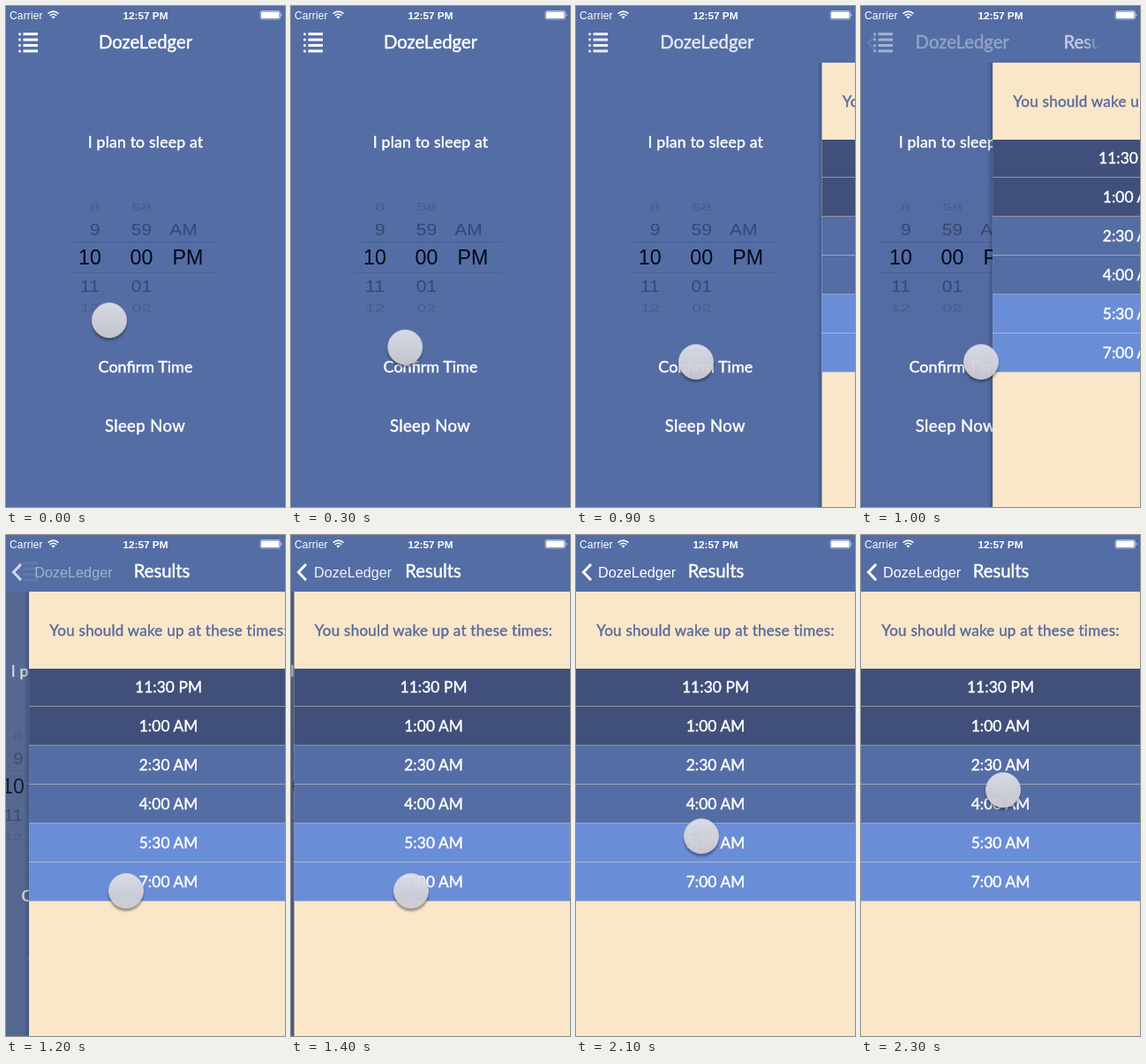
Animation of 316x566 px, one loop 2400 ms. Source, as an HTML page:

```html
<!DOCTYPE html>
<html lang="en">
<head>
<meta charset="utf-8">
<title>Sleep planner</title>
<style>
  html, body { margin: 0; width: 100%; height: 100%; overflow: hidden; background: #546da5; }
  svg { display: block; width: 316px; height: 566px; }
  text { font-family: Lato, sans-serif; fill: #fff; white-space: pre; }
  .geo { stroke: #fff; stroke-width: .45px; }
  .note { fill: #596a9b; stroke: #596a9b; stroke-width: .4px; }
  .heading { fill: url(#reveal); stroke: url(#reveal); stroke-width: .45px; }
  .sys { font-family: "Liberation Sans", Arial, sans-serif; }
  .wheel { fill: #000818; }
</style>
</head>
<body>
<svg viewBox="0 0 316 566">
  <defs>
    <linearGradient id="edge"><stop stop-color="#101c38" stop-opacity="0"/><stop offset="1" stop-color="#101c38" stop-opacity=".25"/></linearGradient>
    <linearGradient id="reveal" gradientUnits="userSpaceOnUse" x1="0" x2="20"><stop stop-color="#fff"/><stop offset="1" stop-color="#fff" stop-opacity="0"/></linearGradient>
    <linearGradient id="idle" x2="0" y2="1"><stop stop-color="#e6e8f0"/><stop offset="1" stop-color="#d2d2d8"/></linearGradient>
    <linearGradient id="pressed" x2="0" y2="1"><stop stop-color="#adabb2"/><stop offset="1" stop-color="#cac8cd"/></linearGradient>
    <filter id="soft" x="-30%" y="-30%" width="160%" height="160%"><feGaussianBlur stdDeviation="1.2"/></filter>
  </defs>
  <rect width="316" height="566" fill="#546da5"/>
  <g id="planner">
    <g id="wheels"></g>
    <path d="M72 266.5H240M72 301.5H240" stroke="#3d5284" stroke-opacity=".4"/>
    <text class="geo" x="158" y="160" font-size="17.6" letter-spacing=".2" text-anchor="middle">I plan to sleep at</text>
    <text class="geo" id="confirm" x="158" y="413.7" font-size="18" text-anchor="middle">Confirm Time</text>
    <text class="geo" x="157.5" y="481" font-size="18.5" letter-spacing=".4" text-anchor="middle">Sleep Now</text>
  </g>
  <rect id="dim" y="64" width="316" height="502" fill="#5a5a5a"/>
  <g id="results">
    <rect x="-6" y="64" width="6" height="502" fill="url(#edge)"/>
    <rect y="64" width="316" height="502" fill="#fae7c9"/>
    <g id="rows"></g>
    <text class="note" x="158" y="113.7" font-size="17" letter-spacing=".25" text-anchor="middle">You should wake up at these times:</text>
  </g>
  <rect width="316" height="64" fill="#546da5"/>
  <g id="menu" fill="#fff"></g>
  <path id="chevron" d="M17 33L8.5 42L17 51" fill="none" stroke="#fff" stroke-width="3"/>
  <text class="geo" id="title" y="48" font-size="20.3" text-anchor="middle">DozeLedger</text>
  <text class="sys" id="back" y="48" font-size="16.2">DozeLedger</text>
  <text class="heading" id="heading" y="48" font-size="20.3" text-anchor="middle">Results</text>
  <text class="sys" x="4" y="14.5" font-size="12" letter-spacing=".15">Carrier</text>
  <g fill="none" stroke="#fff" stroke-width="1.5">
    <path d="M47.5 8.6Q53.5 3.6 59.5 8.6M49.7 10.9Q53.5 7.7 57.3 10.9"/>
    <path d="M53.5 14.6L51.4 12.3Q53.5 10.8 55.6 12.3Z" fill="#fff" stroke="none"/>
  </g>
  <text class="sys" x="158" y="14.5" font-size="11.8" font-weight="700" text-anchor="middle">12:57 PM</text>
  <rect x="288" y="5.5" width="22.5" height="9.5" rx="1.8" fill="none" stroke="#fff" stroke-opacity=".5"/>
  <rect x="289" y="6.5" width="20.5" height="7.5" rx="1" fill="#fff"/>
  <path d="M311.5 8.5Q313.6 10.2 311.5 12Z" fill="#fff" opacity=".8"/>
  <g id="finger">
    <circle cy="3" r="20" fill="#20242e" opacity=".42" filter="url(#soft)"/>
    <circle id="pad" r="19.5" opacity=".9" stroke="#d3d3da"/>
  </g>
</svg>
<script>
const LOOP = 2400, STEP = 100, WIDTH = 316;
const $ = id => document.getElementById(id);
const set = (id, attrs) => {
  for (const name in attrs) $(id).setAttribute(name, attrs[name]);
};
const clamp = v => Math.max(0, Math.min(1, v));
const smooth = v => v * v * (3 - 2 * v);

// Each wheel row: y centre, font size, vertical squash, opacity
const wheelRows = [
  [227, 20, .55, .17], [252, 21, .86, .36], [284, 23.2, 1, 1],
  [316, 21, .86, .36], [341, 20, .55, .17]
];
const columns = [
  { x: 95, labels: ["  8", "  9", "10", "11", "12"] },
  { x: 153.5, labels: ["58", "59", "00", "01", "02"] }
];
const wheelText = (x, label, [y, size, squash, opacity]) =>
  `<text class="sys wheel" transform="translate(${x} ${y}) scale(1 ${squash})" y="${size * .36}"
    font-size="${size}" text-anchor="middle" opacity="${opacity}">${label}</text>`;

$("wheels").innerHTML = columns.map(c =>
  c.labels.map((label, i) => wheelText(c.x, label, wheelRows[i])).join("")
).join("") + wheelText(201, "AM", wheelRows[1]) + wheelText(206, "PM", wheelRows[2]);

const times = ["11:30 PM", "1:00 AM", "2:30 AM", "4:00 AM", "5:30 AM", "7:00 AM"];
const shades = ["#40507a", "#546da5", "#6a8dd8"];
$("rows").innerHTML = times.map((time, i) => {
  const y = 150 + 44 * i;
  return `<rect y="${i ? y : 151}" width="316" height="${i ? 44 : 43}" fill="${shades[i >> 1]}"/>
    <rect y="${y + 43}" width="316" height="1" fill="#fae7c9" opacity=".45"/>
    <text class="geo" x="158" y="${y + 28.2}" font-size="17.3" letter-spacing=".1" text-anchor="middle">${time}</text>`;
}).join("");

$("menu").innerHTML = [0, 1, 2, 3].map(i => 30.2 + 6.4 * i).map(y =>
  `<circle cx="15.5" cy="${y + 1.5}" r="1.5"/><rect x="19.5" y="${y}" width="16.5" height="3"/>`
).join("");

// Critically damped spring for the screen push
function pushProgress(t) {
  const w = Math.max(0, t - 850) * .0118;
  return w > 8.5 ? 1 : 1 - (1 + w) * Math.exp(-w);
}

function fingerAt(t) {
  if (t < 1800) {
    const s = smooth(clamp(t / 500));
    return [117 + 19 * s, 355 + 47 * s];
  }
  const s = (t - 1800) / 500;
  return [136 + 25 * s ** 2.8, 402 - 114 * s ** 1.2];
}

function draw(t) {
  const q = pushProgress(t), rest = 1 - q;
  const held = t >= 500 && t < 800;
  set("planner", { transform: `translate(${-.3 * WIDTH * q} 0)` });
  set("confirm", { opacity: held ? .25 : t === 800 ? .65 : 1 });
  set("dim", { opacity: .38 * q ** 5 });
  set("results", { transform: `translate(${WIDTH * rest} 0)`, visibility: q ? "visible" : "hidden" });
  set("menu", { opacity: 1 - q });
  set("chevron", { opacity: q ** 3.6 });
  set("title", { x: 158 - 82 * q, opacity: clamp(1 - 1.2 * q) });
  set("back", { x: 25 + 89 * rest, opacity: q ** 9 });
  set("heading", { x: 158.5 + 218 * rest, opacity: clamp(1.25 * q) });
  const edge = 252 + 500 * (q - .528);
  set("reveal", { x1: edge, x2: edge + 18 });
  set("finger", { transform: `translate(${fingerAt(t)})` });
  set("pad", { fill: `url(#${held ? "pressed" : "idle"})` });
}

const start = performance.now();
function tick() {
  const t = (performance.now() - start) % LOOP;
  draw(Math.floor(t / STEP) * STEP);
  requestAnimationFrame(tick);
}
tick();
</script>
</body>
</html>
```
